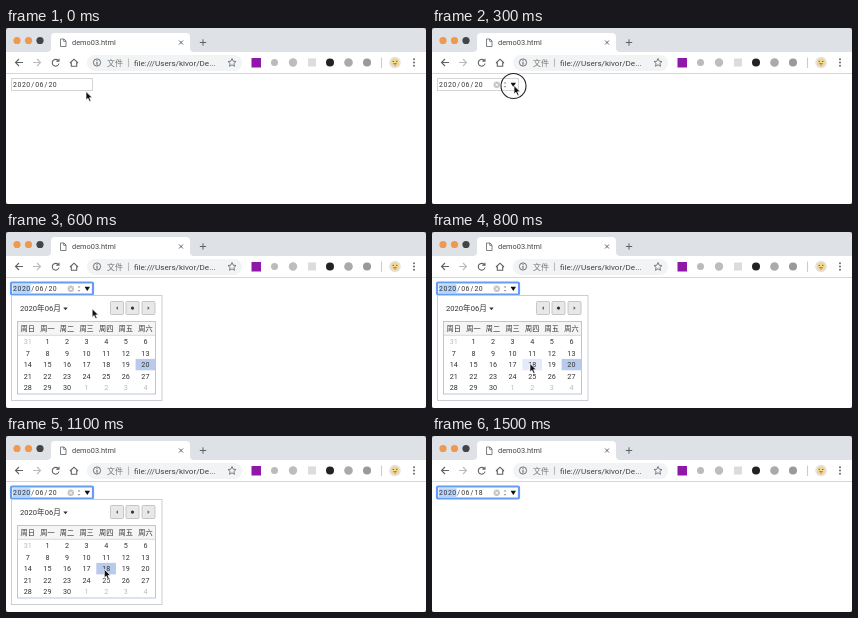
These frames come from a looping animation (420x176 px, 1600 ms). An HTML page:

```html
<!DOCTYPE html>
<html lang="zh">
<head>
<meta charset="utf-8">
<title>Date picker</title>
<style>
html, body { margin: 0; width: 100%; height: 100%; overflow: hidden; background: #777; }
svg { display: block; width: 420px; height: 176px; }
text { font: 8px Roboto, "Noto Sans CJK SC", "Noto Sans CJK", sans-serif; fill: #444; }
.line { fill: none; stroke: #5f6368; stroke-width: 1.1; }
.cal text { font-size: 7.2px; text-anchor: middle; fill: #333; }
.cal .other { fill: #bbb; }
text.date { font-size: 6.9px; text-anchor: middle; fill: #333; }
</style>
</head>
<body>
<svg viewBox="0 0 420 176">
  <rect width="420" height="176" rx="3" fill="#dee1e6"/>
  <path d="M0 24H420V173Q420 176 417 176H3Q0 176 0 173Z" fill="#fff"/>
  <circle cx="11" cy="12.5" r="3.6" fill="#ef9850"/>
  <circle cx="22.5" cy="12.5" r="3.6" fill="#ef9850"/>
  <circle cx="34" cy="12.5" r="3.6" fill="#444"/>

  <path d="M41 24Q45 24 45 20V9Q45 5 49 5H180Q184 5 184 9V20Q184 24 188 24Z" fill="#fff"/>
  <path class="line" d="M54.5 11H58L60 13V18.5H54.5ZM57.7 11V13.3H60" style="stroke-width:.8"/>
  <text x="66" y="17.4" style="font-size:7.4px">demo03.html</text>
  <path class="line" d="M173 12.5L177 16.5M177 12.5L173 16.5M193.8 14.5H200.2M197 11.3V17.7" style="stroke-width:1"/>

  <path class="line" d="M17 34.5H9.5M13 31L9.5 34.5L13 38"/>
  <path class="line" d="M27 34.5H34.5M31 31L34.5 34.5L31 38" style="stroke:#bbb"/>
  <path class="line" d="M52.3 32.6A3.4 3.4 0 1 0 53 35.5M53 30.8V33.3H50.3M64 35L68 31.2L72 35M65.3 34.5V38.3H70.7V34.5"/>
  <rect x="81" y="27" width="155" height="16" rx="8" fill="#f1f3f4"/>
  <circle class="line" cx="91" cy="34.5" r="3.6" style="stroke-width:.9"/>
  <path class="line" d="M91 34V36.7M91 32.2V33.2"/>
  <text x="101" y="37.5" style="fill:#777">文件</text>
  <path class="line" d="M122.5 30.5V39" style="stroke:#bbb"/>
  <text x="128" y="37.5" style="font-size:8.1px">file:///Users/kivor/De...</text>
  <path class="line" d="M226 30.5L227.2 33.2L230 33.5L227.9 35.4L228.5 38.3L226 36.8L223.5 38.3L224.1 35.4L222 33.5L224.8 33.2Z" style="stroke-width:.8"/>

  <rect x="245.5" y="30" width="9.5" height="9.5" fill="#8f18a8"/>
  <circle cx="268.5" cy="34.5" r="3.5" fill="#bbb"/>
  <circle cx="287" cy="34.5" r="4.2" fill="#bdbdbd"/>
  <rect x="302" y="30.5" width="8" height="8" fill="#dcdcdc"/>
  <circle cx="324" cy="34.5" r="4" fill="#222"/>
  <circle cx="342.5" cy="34.5" r="4.3" fill="#aaa"/>
  <circle cx="361" cy="34.5" r="4" fill="#999"/>
  <path class="line" d="M375.5 29.5V40" style="stroke:#ccc"/>
  <circle cx="389" cy="34.5" r="5.8" fill="#e2e2e2"/>
  <circle cx="389" cy="34.5" r="3.9" fill="#f2d884"/>
  <path d="M386.6 33.4H388M390 33.4H391.4" stroke="#654" stroke-width=".9"/>
  <path d="M387 35.3H391Q389 38 387 35.3" fill="#865"/>
  <ellipse cx="389.2" cy="36.9" rx="1" ry="1.1" fill="#e59aa0"/>
  <g fill="#5f6368"><circle cx="408" cy="31.3" r=".95"/><circle cx="408" cy="34.5" r=".95"/><circle cx="408" cy="37.7" r=".95"/></g>
  <path d="M0 45.5H420" stroke="#d5d7da"/>

  <rect x="5.5" y="50.5" width="81" height="12" fill="#fff" stroke="#d4d4d4"/>
  <g id="focus">
    <rect x="5" y="50.5" width="82" height="12" rx="1" fill="none" stroke="#659df2" stroke-width="2.2"/>
    <rect x="6.7" y="52.3" width="17.8" height="8.7" fill="#b4d5fe"/>
  </g>
  <text id="date" class="date" y="59.3"></text>
  <g id="controls">
    <circle cx="64.8" cy="56.8" r="3.2" fill="#c4c4c4"/>
    <path d="M63.5 55.5L66.1 58.1M66.1 55.5L63.5 58.1" stroke="#fff" stroke-width=".9"/>
    <path d="M71.6 55.6L73 53.8L74.4 55.6ZM71.6 58L73 59.8L74.4 58Z" fill="#999"/>
    <path d="M78.6 54.8H84L81.3 59Z" fill="#111"/>
  </g>

  <g id="calendar" class="cal">
    <rect x="5.5" y="63.5" width="150.5" height="105" fill="#fff" stroke="#ccced4"/>
    <text x="14" y="79" style="font-size:7.6px;text-anchor:start">2020年06月</text>
    <path d="M57.3 75.4H61.7L59.5 78.2Z" fill="#333"/>
    <g fill="#e8e8e8" stroke="#bbb" stroke-width=".8">
      <rect x="104.5" y="69.5" width="13" height="13" rx="1"/>
      <rect x="120" y="69.5" width="13" height="13" rx="1"/>
      <rect x="136" y="69.5" width="13" height="13" rx="1"/>
    </g>
    <path d="M112 74.3V77.9L109.9 76.1ZM141.6 74.3V77.9L143.7 76.1Z" fill="#666"/>
    <circle cx="126.5" cy="76.1" r="1.6" fill="#333"/>
    <rect x="11.5" y="89.5" width="138" height="72.5" fill="#fff" stroke="#b3bfdb" stroke-width=".9"/>
    <rect x="12" y="90" width="137" height="13" fill="#f5f5f5"/>
    <path d="M12 103.3H149" stroke="#c8cedd" stroke-width=".8"/>
    <rect id="hover" width="19.6" height="11.4" fill="#e3eaf9"/>
    <rect id="selected" width="19.6" height="11.4" fill="#b9cbec"/>
    <g id="days"></g>
  </g>

  <circle id="click" r="12.5" fill="none" stroke="#222" stroke-width="1.1"/>
  <path id="cursor" d="M0 0V8.6L2 6.8L3.5 10.1L5 9.4L3.6 6.2H6.3Z" fill="#111" stroke="#fff" stroke-width=".7"/>
</svg>
<script>
const LOOP = 1600, STEP = 100, COL = 19.6, ROW = 11.6, LEFT = 12, TOP = 103.7;
const el = id => document.getElementById(id);
const show = (id, on) => el(id).style.display = on ? '' : 'none';
const place = (id, x, y) => el(id).setAttribute('transform', `translate(${x} ${y})`);
const placeCell = (id, col, row) => place(id, LEFT + col * COL, TOP + row * ROW);

// Pointer path: time, x, y
const path = [[0, 80, 63.5], [200, 82, 57.5], [500, 82, 57.5], [800, 98, 131.5], [1100, 98.3, 133.3], [1300, 98.3, 133.3], [1400, 240, 34]];

function label(text, col, y, other) {
  const x = LEFT + (col + .5) * COL;
  return `<text x="${x}" y="${y}"${other ? ' class="other"' : ''}>${text}</text>`;
}
let days = [...'日一二三四五六'].map((d, i) => label('周' + d, i, 99.2)).join('');
for (let i = 0; i < 35; i++) {
  const other = i < 1 || i > 30;
  days += label(i < 1 ? 31 : (i - 1) % 30 + 1, i % 7, TOP + Math.floor(i / 7) * ROW + 8.3, other);
}
el('days').innerHTML = days;

// The date field sets its characters on a monospaced grid
el('date').setAttribute('x', Array.from({ length: 10 }, (_, i) => 9 + i * 4.42).join(' '));

function pointer(t) {
  const i = path.findIndex(p => p[0] > t);
  if (i < 0) return path[path.length - 1].slice(1);
  const [t0, x0, y0] = path[i - 1], [t1, x1, y1] = path[i];
  const u = (t - t0) / (t1 - t0), k = u * u * (3 - 2 * u);
  return [x0 + (x1 - x0) * k, y0 + (y1 - y0) * k];
}

function draw(now) {
  const t = Math.floor(now % LOOP / STEP) * STEP;
  const [x, y] = pointer(t);
  place('cursor', x, y);
  show('cursor', t < 1500);
  place('click', x - .5, y + .5);
  show('click', t === 300 || t === 1000);
  show('focus', t >= 400);
  show('controls', t >= 400 || y < 62.5);
  show('calendar', t >= 400 && t < 1200);
  el('date').textContent = t >= 1200 ? '2020/06/18' : '2020/06/20';

  const col = Math.floor((x - LEFT) / COL), row = Math.floor((y - TOP) / ROW);
  show('hover', row >= 0 && row < 5 && col >= 0 && col < 7);
  placeCell('hover', col, row);
  placeCell('selected', t >= 1100 ? 4 : 6, 2);
  requestAnimationFrame(() => draw(performance.now()));
}
draw(performance.now());
</script>
</body>
</html>
```
